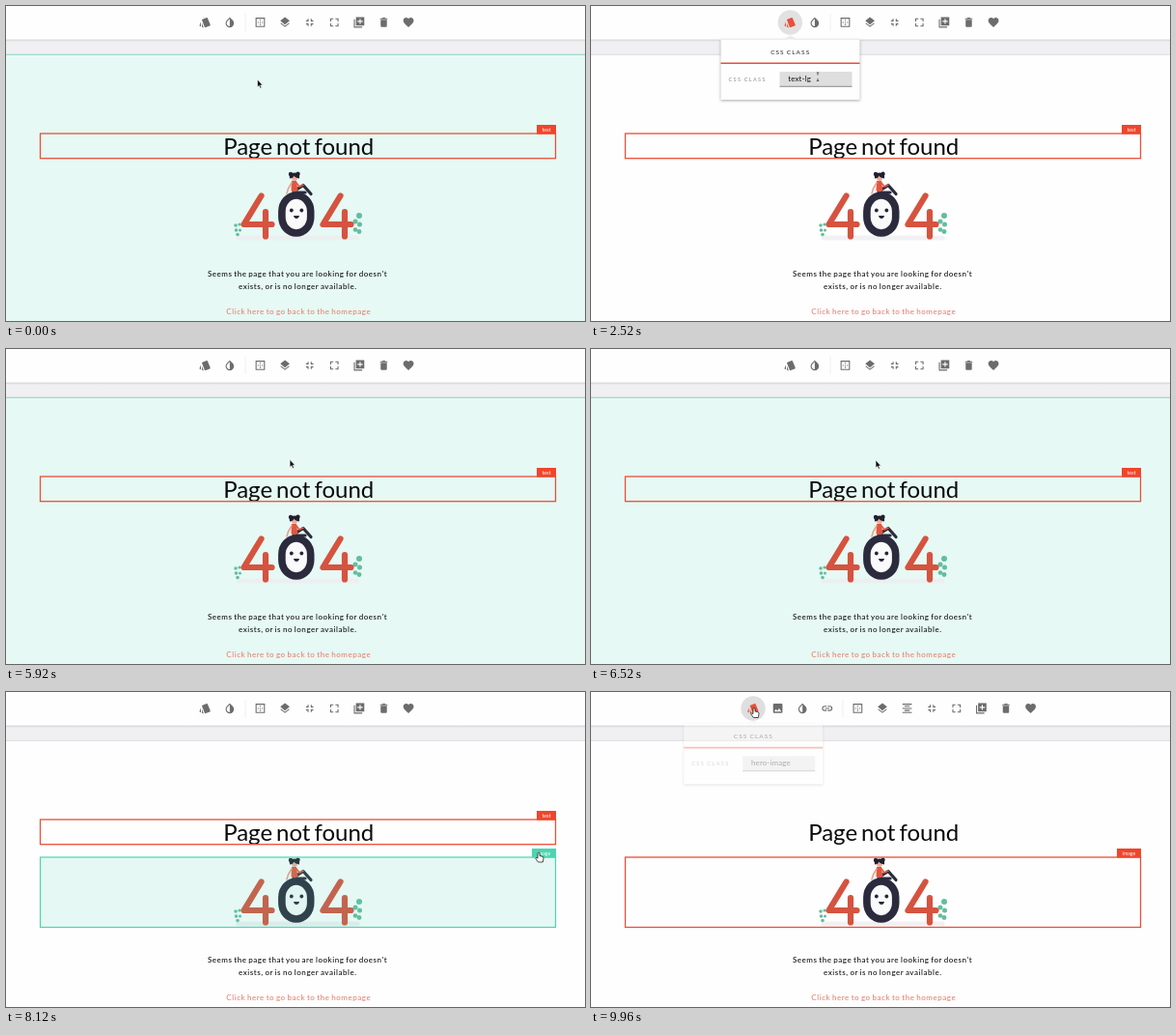
An HTML page for the animation above (10 s loop, 600 px wide and 326 px high).

```html
<!DOCTYPE html>
<html lang="en">
<head>
<meta charset="utf-8">
<title>Page editor</title>
<style>
html, body { margin: 0; width: 100%; height: 100%; overflow: hidden; background: #fff; }
svg { display: block; width: 600px; height: 326px; font-family: Lato, sans-serif; }
text { white-space: pre; word-spacing: -.09em; }
.copy { font-size: 8px; font-weight: 500; letter-spacing: .53px; text-anchor: middle; fill: #111; }
.tag { font-size: 5.3px; fill: #fff; text-anchor: middle; }
#panel { filter: drop-shadow(0 1px 1.5px #0005); }
</style>
</head>
<body>
<svg viewBox="0 0 600 326">
  <defs>
    <linearGradient id="shade" x2="0" y2="1">
      <stop stop-color="#cfcfd1"/><stop offset="1" stop-color="#f0eff1"/>
    </linearGradient>
  </defs>
  <rect width="600" height="326" fill="#fefefe"/>
  <rect y="34" width="600" height="16" fill="#f0eff1"/>
  <rect y="34.500" width="600" height="2.500" fill="url(#shade)"/>
  <path d="M0 50.300H600" stroke="#dddcde"/>
  <g id="pageHover">
    <rect y="50" width="600" height="276" fill="#e6f9f4"/>
    <path d="M0 50.300H600" stroke="#8ad8c4"/>
  </g>

  <g id="textHover">
    <rect x="36" y="132" width="534" height="25.500" fill="#e8f8f5"/>
    <rect x="550" y="123" width="20" height="9.500" fill="#4bd6b0"/>
    <text class="tag" x="560" y="129.500">text</text>
  </g>
  <text x="303.200" y="154" font-size="24" text-anchor="middle" fill="#0a0a0a">Page not found</text>
  <text class="copy" x="302" y="280">Seems the page that you are looking for doesn't</text>
  <text class="copy" x="302.300" y="293">exists, or is no longer available.</text>
  <text class="copy" x="303.300" y="318.500" style="fill:#e8806f">Click here to go back to the homepage</text>

  <g id="art" stroke-linecap="round" stroke-linejoin="round" fill="none">
    <path d="M241 240H364" stroke="#eeedef" stroke-width="5" opacity=".8"/>
    <g id="leaves" fill="#64bd9f"/>
    <g stroke="#d5533f" stroke-width="6.200">
      <path id="four" d="M264.500 196.500 246.500 226H275.500M269 213V238.500"/>
      <use href="#four" x="82"/>
    </g>
    <rect x="285.900" y="196" width="29.800" height="39" rx="14.900" ry="16.500" fill="#fafafa" stroke="#2b2b3d" stroke-width="7.600"/>
    <g fill="#25253a">
      <circle cx="295.800" cy="211.500" r="1.900"/><circle cx="306.300" cy="211.500" r="1.900"/>
      <path d="M298 217h6q-.6 3-3 3t-3-3z"/>
    </g>
    <path d="M298 192 308 185.500 316 194.500M298 193H310" stroke="#2b2b3d" stroke-width="3.200"/>
    <path d="M296 181h5l1.500 10q-4 2.500-7 0z" fill="#e0573f"/>
    <path d="M296 183 292.500 189 291 194" stroke="#e9a08c" stroke-width="1.600"/>
    <path d="M301 183 304 187 308 185" stroke="#e0573f" stroke-width="1.600"/>
    <circle cx="299" cy="178" r="3" fill="#f0ab97"/>
    <path d="M294 178.500q-1.500-6 5-6 6 0 5 6-5-1-5.500-3-1 3-4.500 3z" fill="#202030"/>
    <circle cx="295" cy="174" r="2.200" fill="#202030"/>
    <circle cx="302.500" cy="173.800" r="2.200" fill="#202030"/>
  </g>

  <g id="imageHover">
    <rect x="35.500" y="171" width="534" height="72.500" fill="#4fd1ae" fill-opacity=".14" stroke="#4bd6b0" stroke-width="1.200"/>
    <rect x="545" y="162" width="25" height="9.500" fill="#4bd6b0"/>
    <text class="tag" x="557.500" y="168.500">image</text>
  </g>
  <g id="textPick">
    <rect x="35.500" y="132" width="534" height="25.700" fill="none" stroke="#ea4f38" stroke-width="1.300"/>
    <rect x="550" y="123" width="20" height="9.500" fill="#f0452b"/>
    <text class="tag" x="560" y="129.500">text</text>
  </g>
  <g id="imagePick">
    <rect x="35.500" y="171" width="534" height="72.500" fill="none" stroke="#ea4f38" stroke-width="1.300"/>
    <rect x="545" y="162" width="25" height="9.500" fill="#f0452b"/>
    <text class="tag" x="557.500" y="168.500">image</text>
  </g>

  <rect width="600" height="34.500" fill="#fefefe"/>
  <circle id="halo" cy="17" r="12.700" fill="#dfdfe0"/>
  <g id="textBar"/>
  <g id="imageBar"/>

  <g id="panel">
    <path d="M202 35 206.500 31 211 35z" fill="#e9e9e9"/>
    <rect x="134.500" y="34.500" width="144" height="62.500" fill="#fefefe"/>
    <text x="206.700" y="49.800" font-size="6.500" letter-spacing="1.050" text-anchor="middle" fill="#222">CSS CLASS</text>
    <path d="M134.500 59.300H278.500" stroke="#ea4f38" stroke-width="1.600"/>
    <text x="142.500" y="77.800" font-size="5.500" letter-spacing="1.400" fill="#8c8c8c">CSS CLASS</text>
    <rect id="field" x="195.500" y="68" width="75" height="15.500"/>
    <path id="rule" d="M195.500 83.300H270.500"/>
    <text id="value" x="204.300" y="78" font-size="8" letter-spacing=".1" fill="#111"></text>
    <path id="caret" d="M232.300 70.500V80" stroke="#ea4f38" stroke-width=".8"/>
  </g>

  <g id="pointer">
    <path id="arrow" d="M0 0V8L1.800 6.400 3 9.200 4.400 8.600 3.200 5.900H5.500z" fill="#111" stroke="#fff" stroke-width=".6"/>
    <path id="hand" d="M-1 .5Q0-.6 1 .5V3.500L4 4.300Q5.200 4.600 5 6L4.300 10H-.6L-3.300 6.200Q-3.200 4.800-1 6z" fill="#fff" stroke="#222" stroke-width=".8"/>
    <path id="beam" d="M-1.200-5H1.200M0-4.500V-2.500M0 1V3M-1.200 3.500H1.200" stroke="#333" stroke-width=".8"/>
  </g>
</svg>
<script>
const $ = id => document.getElementById(id);
const NS = 'http://www.w3.org/2000/svg';
const add = (parent, tag, attrs) => {
  const el = parent.appendChild(document.createElementNS(NS, tag));
  for (const k in attrs) el.setAttribute(k, attrs[k]);
  return el;
};

// Icons on a 24-unit grid
const icons = {
  style: 'M6 7.500Q6 6.500 7 6L15 3Q16.500 2.500 17 4L22 16Q22.500 18 21 18.500L13.500 21.500Q12 22 11 20.500zM4 11V20L2.500 19.500Q1 18.500 1.500 17zM6 13.500 9.300 21.800H8Q6 21.500 6 20z',
  drop: 'M12 2.300 17.700 8A8 8 0 1 1 6.300 8zM12 5.100 7.700 9.400A6 6 0 0 0 12 19.600z',
  border: 'M3 3H21V21H3zM5 5V19H19V5zM11 7h2v2h-2zM11 11h2v2h-2zM11 15h2v2h-2zM7 11h2v2h-2zM15 11h2v2h-2z',
  layers: 'M12 2 21 9 12 16 3 9zM4.600 12.800 12 18.500 19.400 12.800 21 14 12 21 3 14z',
  shrink: 'M8 5h2v5H5V8h3zM14 5h2v3h3v2h-5zM5 14h5v5H8v-3H5zM14 14h5v2h-3v3h-2z',
  expand: 'M4 4h6v2H6v4H4zM14 4h6v6h-2V6h-4zM4 14h2v4h4v2H4zM18 14h2v6h-6v-2h4z',
  copy: 'M2 6h2v14h14v2H2zM6 2H22V18H6zM13 5V9H9v2h4v4h2v-4h4V9h-4V5z',
  trash: 'M6 7H18V19Q18 21 16 21H8Q6 21 6 19zM5 4H8.500L9.500 3H14.500L15.500 4H19V6H5z',
  heart: 'M12 21.300C5 15 2 12.500 2 8.500 2 3 9 1 12 5 15 1 22 3 22 8.500 22 12.500 19 15 12 21.300z',
  image: 'M5 3H19Q21 3 21 5V19Q21 21 19 21H5Q3 21 3 19V5Q3 3 5 3zM8.500 13.500 5 18H19L14.500 12 11 16.500z',
  link: 'M11 7H7a5 5 0 0 0 0 10h4v-2H7a3 3 0 0 1 0-6h4zM13 7h4a5 5 0 0 1 0 10h-4v-2h4a3 3 0 0 0 0-6h-4zM8 11h8v2H8z',
  align: 'M3 3H21V5H3zM7 7H17V9H7zM3 11H21V13H3zM7 15H17V17H7zM3 19H21V21H3z'
};

// A '|' stands for the divider; returns the first icon
function buildBar(bar, x, names) {
  names.split(' ').forEach(name => {
    if (name === '|') {
      add(bar, 'path', { d: `M${x - 9.5} 8V26`, stroke: '#efefef' });
      x += 6;
      return;
    }
    add(bar, 'path', {
      d: icons[name], fill: '#6c6c6e', 'fill-rule': 'evenodd',
      transform: `translate(${x - 6.5} 10.5) scale(.54)`
    });
    x += 25.6;
  });
  return bar.firstChild;
}
const textStyle = buildBar($('textBar'), 206.3, 'style drop | border layers shrink expand copy trash heart');
const imageStyle = buildBar($('imageBar'), 168, 'style image drop link | border layers align shrink expand copy trash heart');

const leaves = [[238, 227, 1.8], [242, 226, 1.6], [238.5, 232, 1.8], [242.5, 232, 1.5], [240, 236.5, 1.8],
  [366, 217, 3], [362, 223, 2.5], [366.5, 226, 2.5], [362, 231.5, 2.3], [366, 233.5, 2.4]];
leaves.forEach(([cx, cy, r]) => add($('leaves'), 'circle', { cx, cy, r }));

// Pointer tip: time, x, y
const path = [[0, 260.5, 76], [350, 253, 68], [1060, 207, 18], [2200, 207, 17], [2480, 235, 74],
  [4920, 235, 74], [5320, 288, 106], [6200, 296, 117], [6520, 295, 115], [6850, 380, 137],
  [7400, 525, 176], [7850, 552, 166], [8560, 552, 166], [9040, 424, 98], [9640, 170, 19],
  [9720, 169, 16.5], [10000, 169, 16.5]];

const ramp = (t, from, span) => Math.min(1, Math.max(0, (t - from) / span));
const pulse = (t, on, off, span = 200) => ramp(t, on, span) * (1 - ramp(t, off, span));
const between = (t, a, b) => t >= a && t < b;
const fade = (id, v) => $(id).setAttribute('opacity', v);
const show = (id, on) => { $(id).style.display = on ? '' : 'none'; };

function pointerAt(t) {
  const i = path.findIndex(p => p[0] > t);
  const [t0, x0, y0] = path[i - 1], [t1, x1, y1] = path[i];
  const u = (t - t0) / (t1 - t0), k = u * u * (3 - 2 * u);
  return [x0 + (x1 - x0) * k, y0 + (y1 - y0) * k];
}

function valueAt(t) {
  if (t > 8300) return 'hero-image';
  if (t < 3550) return 'text-lg';
  if (t < 3700) return 'text-l';
  if (t < 4100) return 'text-';
  return t < 4400 ? 'text-s' : 'text-sm';
}

function draw() {
  const t = performance.now() % 10000;
  const second = t >= 8300;

  fade('pageHover', Math.max(1 - ramp(t, 720, 220), pulse(t, 5600, 6720), pulse(t, 9080, 9380)));
  fade('textHover', pulse(t, 8700, 9050, 140));
  fade('imageHover', second ? 0 : ramp(t, 7300, 200));
  show('textPick', !second);
  show('imagePick', second);
  show('textBar', !second);
  show('imageBar', second);

  $('halo').setAttribute('cx', second ? 168 : 206.3);
  fade('halo', Math.max(pulse(t, 1150, 2500, 300), ramp(t, 9680, 200)));
  textStyle.setAttribute('fill', between(t, 1200, 5560) ? '#ea4f38' : '#6c6c6e');
  imageStyle.setAttribute('fill', t > 9740 ? '#ea4f38' : '#6c6c6e');

  const open = Math.max(pulse(t, 1500, 5480, 240), ramp(t, 9880, 240));
  fade('panel', open);
  $('panel').setAttribute('transform', `translate(${second ? -38.3 : 0} ${-2.5 * (1 - open)})`);
  const focused = between(t, 3250, 5480);
  $('field').setAttribute('fill', focused ? '#cbcbcb' : '#dedede');
  $('rule').setAttribute('stroke', focused ? '#ea4f38' : '#777');
  $('rule').setAttribute('stroke-width', focused ? 1.5 : .8);
  const value = valueAt(t);
  if ($('value').textContent !== value) $('value').textContent = value;
  show('caret', focused);
  if (focused) {
    const x = $('value').getComputedTextLength() + 204.6;
    $('caret').setAttribute('d', `M${x} 70.5V80`);
  }

  const [x, y] = pointerAt(t);
  $('pointer').setAttribute('transform', `translate(${x} ${y})`);
  const beam = between(t, 2420, 5020);
  const hand = between(t, 1040, 2300) || between(t, 7700, 8620) || t > 9640;
  show('beam', beam);
  show('hand', hand);
  show('arrow', !beam && !hand);
  requestAnimationFrame(draw);
}
draw();
</script>
</body>
</html>
```
